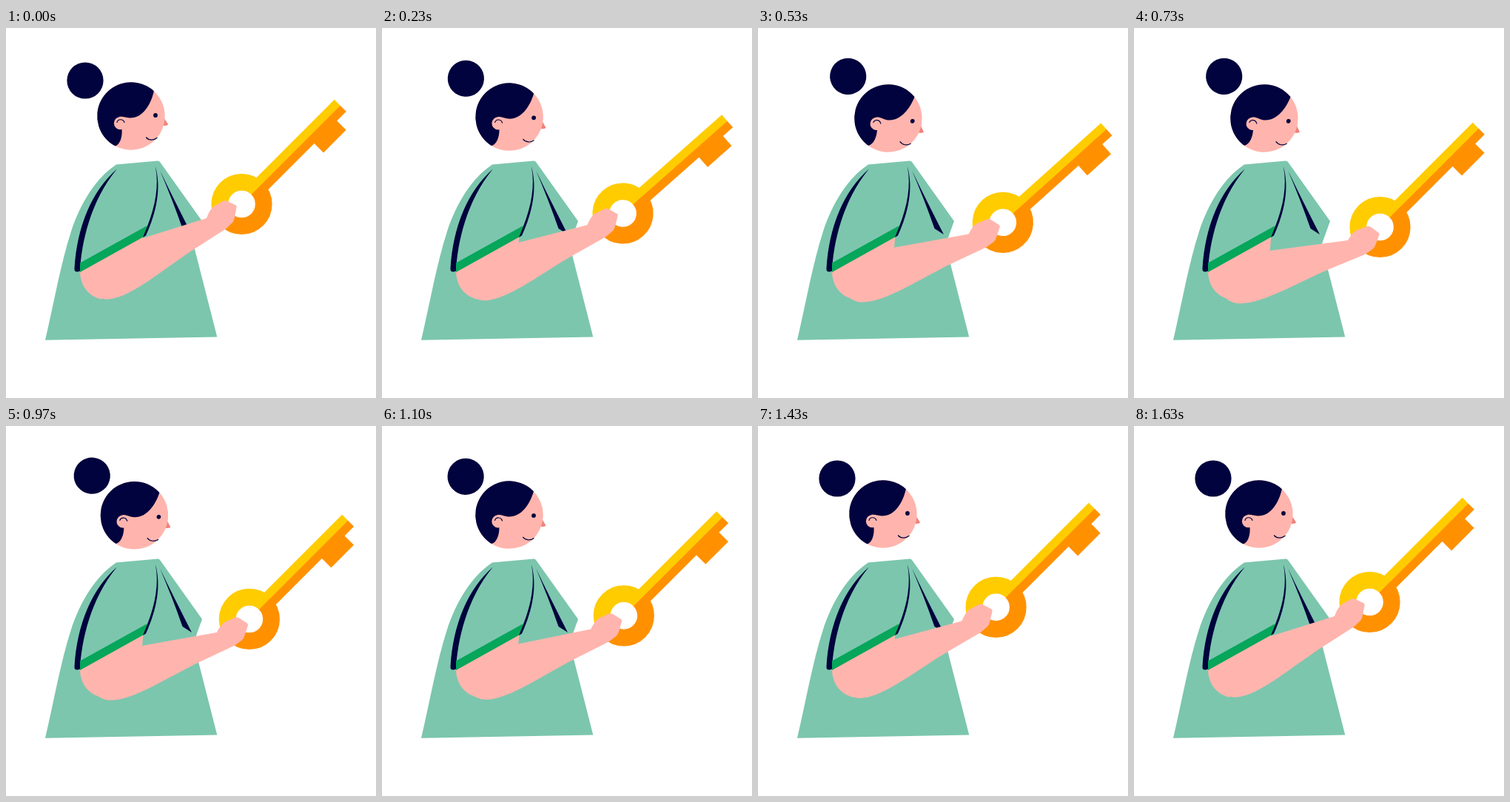
Write an HTML page with a canvas that moves like this. It is 500 px wide and 500 px high and loops after 2010 ms.

```html
<!DOCTYPE html>
<html lang="en">
<head>
<meta charset="utf-8">
<title>Woman with a key</title>
<style>
html, body { margin: 0; width: 100%; height: 100%; overflow: hidden; background: #fff; }
canvas { display: block; width: 100vmin; height: 100vmin; }
</style>
</head>
<body>
<canvas id="stage" width="500" height="500"></canvas>
<script>
const ctx = document.getElementById('stage').getContext('2d');
const LOOP = 2010;
const STEP = 100 / 3;
const RAD = Math.PI / 180;
const NAVY = '#00033d', SKIN = '#ffb5ad', NOSE = '#f0837a';
const GREEN = '#7cc6ae', BAND = '#06a65b', YELLOW = '#ffcc00', ORANGE = '#ff9100';

// Linear interpolation through [step, value] pairs
function track(keys, n) {
  for (let i = 1; i < keys.length; i++) {
    const [a, va] = keys[i - 1], [b, vb] = keys[i];
    if (n <= b) return va + (vb - va) * (n - a) / (b - a);
  }
  return keys[keys.length - 1][1];
}

const headTurn = [[0, 0], [16, 8.5], [22, 8.5], [41, 0]];
const armDrop = [[0, 0], [22, 1], [49, 0]];
const keyTurn = [[0, 0], [11, 5.5], [22, 0]];

function shape(d, color) {
  ctx.fillStyle = color;
  ctx.fill(new Path2D(d));
}

function line(d, width) {
  ctx.strokeStyle = NAVY;
  ctx.lineWidth = width;
  ctx.lineCap = 'round';
  ctx.stroke(new Path2D(d));
}

function disc(x, y, r, color) {
  ctx.fillStyle = color;
  ctx.beginPath();
  ctx.arc(x, y, r, 0, 2 * Math.PI);
  ctx.fill();
}

function turned(x, y, degrees, draw) {
  ctx.save();
  ctx.translate(x, y);
  ctx.rotate(degrees * RAD);
  ctx.translate(-x, -y);
  draw();
  ctx.restore();
}

function drawHead() {
  disc(107, 71, 24.6, NAVY);
  shape('M213.5 121.5 L219.3 130.5 Q217 132.5 212 132 Z', NOSE);
  disc(169, 119, 45.7, SKIN);

  ctx.fillStyle = NAVY;
  ctx.beginPath();
  ctx.arc(169, 119, 45.8, 118 * RAD, 312.4 * RAD);
  ctx.bezierCurveTo(196, 103, 185, 122, 167, 121.5);
  ctx.bezierCurveTo(161, 121, 158, 119, 153, 120);
  ctx.lineTo(156.5, 137);
  ctx.bezierCurveTo(157.5, 147, 154, 158, 147.5, 159.4);
  ctx.fill();

  disc(154.5, 128.7, 8.6, SKIN);
  line('M150 127.5 C151.5 122.5 158 122.5 160 127.5', 1.2);
  disc(202, 118, 2.9, NAVY);
  line('M189.5 148 C193 152 200 152 204 148.5', 1.2);
}

function drawTorso() {
  shape('M53 421.7 C65 370 74 318 88 275 C100 238 121 203 149 184.5 ' +
    'L205 179.5 Q207 179.5 208 181 L265 261 L253.5 293 L285.3 417.5 Z', GREEN);
  shape('M150 190.5 C116 220 96 268 92.5 325 Q92 329.5 96.5 329.5 ' +
    'L100 328.5 C102 290 114 234 150 190.5 Z', NAVY);
  shape('M208 192.5 Q226 230 251 279 L238.5 271 Q225 232 208 192.5 Z', NAVY);
}

function drawForearm() {
  shape('M160 292 L185 284 L271 257 Q275 246 280 241.5 L293 234 Q296 232.5 299 234 ' +
    'L310.5 239.5 Q312.5 241 311.5 243 L309 256 Q308.5 260 306 263 L297 271.5 L254 299 ' +
    'C215 324 172 362 141 366.3 C124 368.5 114 357 112 345 Z', SKIN);
}

function drawSleeve() {
  shape('M100 328 C100 348 111 362 128 366.5 L150 350 L183.7 302 L185.5 280 Z', SKIN);
  shape('M100 317.5 L191 267 L188 281 L100 330 Z', BAND);
  shape('M201.8 187 C207 212 202 240 191 268 L185 283 L189 280.5 ' +
    'C204 248 210 215 201.8 187 Z', NAVY);
}

// Laid out along the shaft, with the ring at the centre
function drawKey() {
  ctx.save();
  ctx.translate(318.5, 238);
  ctx.rotate(-45 * RAD);
  ctx.lineWidth = 22.8;
  ctx.lineCap = 'butt';
  for (const [color, from] of [[YELLOW, Math.PI], [ORANGE, 0]]) {
    ctx.strokeStyle = color;
    ctx.beginPath();
    ctx.arc(0, 0, 29.7, from, from + Math.PI);
    ctx.stroke();
  }
  shape('M28 -11.2 H188.4 V0.3 H18.5 V0 Z', YELLOW);
  shape('M18.5 0 H188.4 V11.4 H170.6 V29 H127.3 V11.4 H28 Z', ORANGE);
  ctx.restore();
}

function render(n) {
  const drop = track(armDrop, n);
  ctx.fillStyle = '#fff';
  ctx.fillRect(0, 0, 500, 500);
  turned(152.5, 167.5, track(headTurn, n), drawHead);
  drawTorso();
  ctx.save();
  ctx.translate(14 * drop, 31 * drop);
  turned(276.5, 281, track(keyTurn, n), drawKey);
  ctx.restore();
  turned(108, 374, 10 * drop, drawForearm);
  drawSleeve();
}

const start = performance.now();

function tick(now) {
  const t = Math.max(0, now - start) % LOOP;
  // Steps of a thirtieth of a second, on a 10 ms grid
  render(Math.floor((Math.floor(t / 10) * 10 + 4) / STEP));
  requestAnimationFrame(tick);
}

render(0);
requestAnimationFrame(tick);
</script>
</body>
</html>
```
